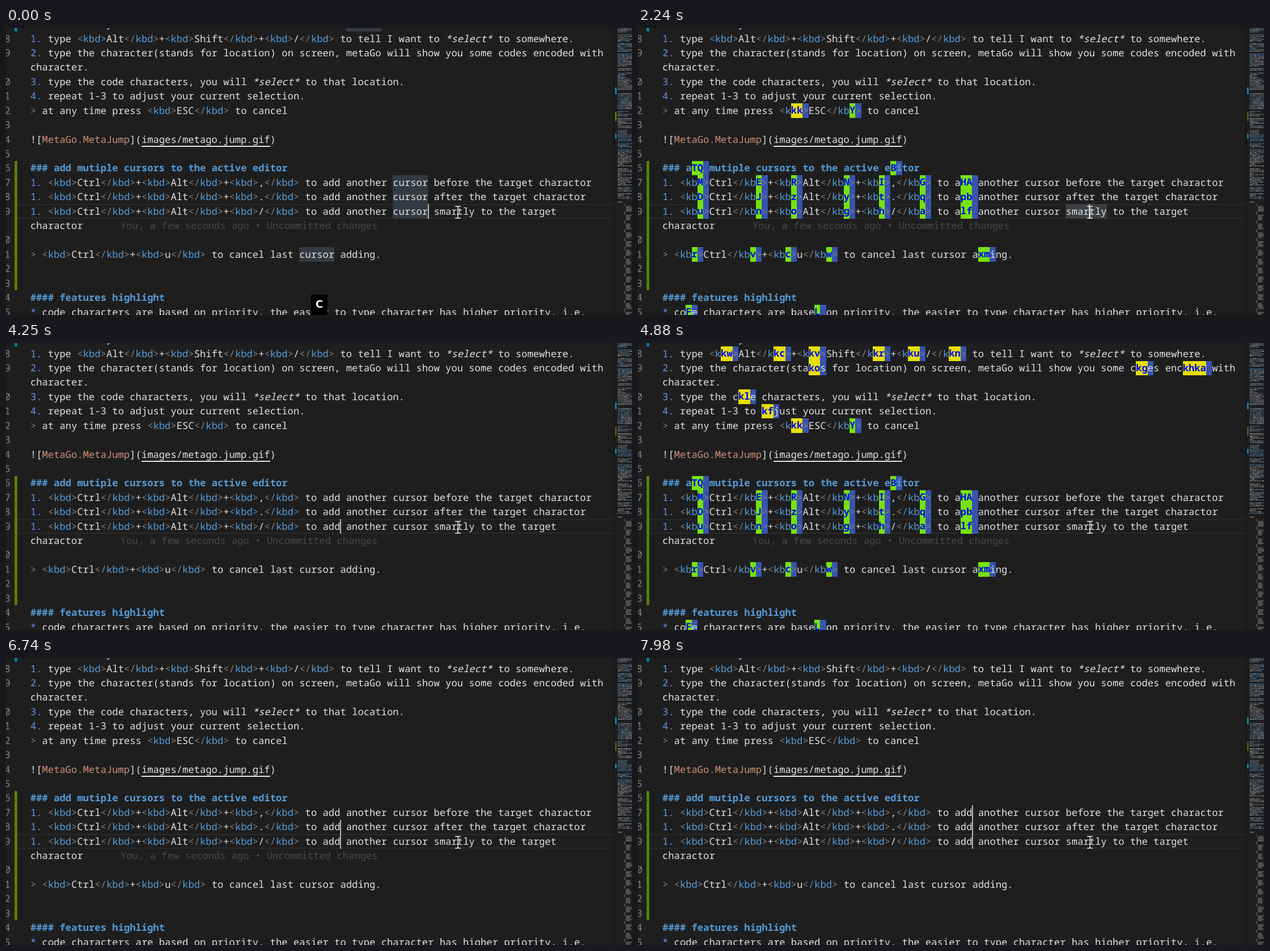
These frames come from a looping animation (1104x507 px, 8000 ms). An HTML page with a canvas:

```html
<!DOCTYPE html>
<html lang="en">
<head>
<meta charset="utf-8">
<title>Multiple cursors</title>
<style>
  html, body { margin: 0; width: 100%; height: 100%; overflow: hidden; background: #1e1e1e; }
  #stage {
    position: relative; width: 1104px; height: 507px; overflow: hidden;
    background: #1e1e1e; color: #e2e2e2;
    font: 500 17.185px/25.42px "Noto Sans Mono", "DejaVu Sans Mono", monospace;
    font-variant-ligatures: none; text-rendering: geometricPrecision;
  }
  #stage > * { position: absolute; white-space: pre; }
  .number { color: #858585; }
  .list { color: #6796e6; }
  .tag { color: #569cd6; }
  .bracket, .quote { color: #808080; }
  .heading { color: #569cd6; font-weight: bold; }
  .link { color: #ce9178; }
  .em { font-style: italic; }
  .note { color: #494949; }
  .green { color: #6a9955; }
  .word { background: #343a41; }
  .picked { background: #3b3e42; }
  .after { background: #3853ad; }
  .code { background: #74e30a; color: #00f; font-weight: bold; }
  .code.pair { background: #e6e000; }
  .caret { background: #b4b5b3; width: 2px; }
  .key {
    left: 538px; top: 471px; width: 29px; height: 36px; background: #000; color: #fff;
    font: bold 18px/36px "DejaVu Sans", sans-serif; text-align: center;
  }
</style>
</head>
<body>
<div id="stage"></div>
<script>
const LOOP = 8000, LEFT = 43, PITCH = 10.311, TOP = 6.1, ROW = 25.42, TEXT_DROP = 0.5;
const stage = document.getElementById('stage');
const timed = [];

const colX = col => LEFT + col * PITCH;
const rowY = row => TOP + row * ROW;

function add(cls, style, text = '') {
  const el = document.createElement('div');
  el.className = cls;
  el.textContent = text;
  for (const key in style) el.style[key] = typeof style[key] === 'number' ? style[key] + 'px' : style[key];
  stage.append(el);
  return el;
}
const box = (left, top, width, height, background) => add('', { left, top, width, height, background });
const cells = (cls, row, col, count) =>
  add(cls, { left: colX(col), top: rowY(row), width: count * PITCH, height: ROW });
const during = (el, ...spans) => (timed.push([el, spans]), el);

// Each word gets its own place on the character grid.
function write(cls, row, col, text) {
  return [...text.matchAll(/\S+/g)].map(m =>
    add(cls, { left: colX(col + m.index), top: rowY(row) + TEXT_DROP }, m[0]));
}

const keys = (...names) => names.map(n => `<kbd>${n}</kbd>`).join('+');
const lines = {
  0: `1. type ${keys('Alt', 'Shift', '/')} to tell I want to *select* to somewhere.`,
  1: '2. type the character(stands for location) on screen, metaGo will show you some codes encoded with',
  2: 'character.',
  3: '3. type the code characters, you will *select* to that location.',
  4: '4. repeat 1-3 to adjust your current selection.',
  5: `> at any time press ${keys('ESC')} to cancel`,
  7: '![MetaGo.MetaJump](images/metago.jump.gif)',
  9: '### add mutiple cursors to the active editor',
  10: `1. ${keys('Ctrl', 'Alt', ',')} to add another cursor before the target charactor`,
  11: `1. ${keys('Ctrl', 'Alt', '.')} to add another cursor after the target charactor`,
  12: `1. ${keys('Ctrl', 'Alt', '/')} to add another cursor smartly to the target`,
  13: 'charactor',
  15: `> ${keys('Ctrl', 'u')} to cancel last cursor adding.`,
  18: '#### features highlight',
  19: '* code characters are based on priority, the easier to type character has higher priority, i.e.'
};

// Jump codes, one for each "d" of a line.
const codes = {
  0: 'kw kc kv kr ku kn', 1: 'ko kg kh ka', 3: 'kl', 4: 'kf', 5: 'kk Y',
  9: 'T Q B', 10: 'M E R N I G H A', 11: 'D J z y t q p b', 12: 'u n o g h a l f',
  15: 'r v c w x m', 19: 'F L'
};
const eachCode = fn => {
  for (const row in codes) {
    const names = codes[row].split(' ');
    [...lines[row].matchAll(/d/g)].forEach((m, i) =>
      fn(+row, m.index, names[i], row < 5 ? [[4880, 5810], [7140, 7980]]
                                          : [[2240, 3100], [4880, 5810], [7140, 7980]]));
  }
};

function drawBackground() {
  for (const y of [311, 335]) box(20, y, 1052, 1.5, '#292929');
  box(15, 0, 5, 6, '#0c7d9d');
  box(15, 235, 5, 228, '#587c0c');
  for (const [row, col] of [[-1, 54], [10, 62], [11, 62], [12, 62], [15, 46]])
    during(cells('word', row, col, 6), [0, 840]);
  during(cells('picked', 12, 69, 7), [1070, 3100]);
  eachCode((row, col, name, spans) => during(cells('after', row, col + 1, 1), ...spans));
}

function drawText() {
  const token = /(^#+ .*)|(^\d\.|^\* )|(^>)|(<\/?)(kbd)(>)|(\*select\*)|(MetaGo\.MetaJump)/g;
  const styles = ['heading', 'list', 'quote', 'bracket', 'tag', 'bracket', 'em', 'link'];
  for (const row in lines) {
    const line = lines[row];
    let end = 0;
    for (const m of line.matchAll(token)) {
      write('', +row, end, line.slice(end, m.index));
      let col = m.index;
      m.slice(1).forEach((part, i) => {
        if (!part) return;
        const parts = write(styles[i], +row, col, part);
        if (styles[i] === 'quote') {
          during(parts[0], [0, 140]);
          during(write('green', +row, col, part)[0], [140, LOOP]);
        }
        col += part.length;
      });
      end = m.index + m[0].length;
    }
    write('', +row, end, line.slice(end));
  }
  write('heading', -1, 13, 'y');
  box(colX(19), 208, 22 * PITCH, 2, '#e2e2e2');

  [...'89 01234567' + '89 012345'].forEach((digit, row) =>
    add('number', { left: -2.5, top: rowY(row) + TEXT_DROP }, digit));

  const noteCol = (202 - LEFT) / PITCH;
  for (const el of write('note', 13, noteCol, 'You, a few seconds ago • Uncommitted changes'))
    during(el, [0, 5810], [6440, 7980]);
}

function drawCarets() {
  const caret = (row, col, ...spans) =>
    during(add('caret', { left: colX(col) - 0.4, top: rowY(row), height: ROW }), ...spans);
  const pair = [[5810, 6280], [6740, 7140], [7750, LOOP]];
  caret(12, 68, [0, 610]);
  caret(12, 73, [1070, 1540], [2090, 2560], [3020, 3100]);
  caret(12, 53, [3100, 3560], [4020, 4560], [5030, 5490], ...pair);
  caret(11, 53, ...pair);
  caret(10, 53, [7980, LOOP]);
}

function drawMinimap() {
  box(1070, 0, 4, 507, 'linear-gradient(90deg, #1e1e1e, #141414)');
  const canvas = document.createElement('canvas');
  canvas.width = 28;
  canvas.height = 507;
  canvas.style.cssText = 'left:1076px;top:0';
  stage.append(canvas);
  const g = canvas.getContext('2d');
  let seed = 7;
  const random = () => (seed = seed * 16807 % 2147483647) / 2147483647;

  for (let y = 1, i = 0; y < 302; y += 2.6, i++) {
    if (i % 13 === 3 || i % 17 === 9) continue;
    const blue = i % 13 === 4 || (y > 118 && y < 130) || (y > 188 && y < 214);
    const end = random() < 0.6 ? 28 : 8 + random() * 18;
    for (let x = 3; x < end;) {
      const w = 1 + random() * 4;
      g.globalAlpha = 0.4 + random() * 0.4;
      g.fillStyle = random() < (blue ? 0.75 : 0.25) ? '#569cd6' : '#c4c4c4';
      g.fillRect(x, y, Math.min(w, end - x), 1.4);
      x += w + 0.8;
    }
  }
  g.globalAlpha = 0.6;
  g.fillStyle = '#c4c4c4';
  g.fillRect(3, 307, 8, 1.3);
  for (let y = 312, i = 0; y < 507; y += 2.6, i++) {
    const edge = i % 6 === 0 || i % 6 === 5;
    g.fillStyle = edge ? '#aaa' : i % 2 ? '#b5a090' : '#a8adb2';
    g.fillRect(edge ? 14 : 17, y, edge ? 2 : 7 + random() * 4, 1.5);
  }
  box(1074, 105, 3, 12, '#1b81a8');
  box(1074, 187, 3, 8, '#1b81a8');
  during(box(1074, 148, 3, 16, '#587c0c'), [0, 140]);
  during(box(1074, 148, 3, 16, '#5c521c'), [140, LOOP]);
}

function drawPointer() {
  const el = add('', { left: 790, top: 312.5 });
  el.innerHTML = `<svg width="14" height="25" style="display:block" fill="none" stroke="#eee" stroke-width="1.5">
    <path d="M2 2H5Q7 2 7 4Q7 2 9 2H12M7 4V21M2 23H5Q7 23 7 21Q7 23 9 23H12M5 16H9"/></svg>`;
}

drawBackground();
drawText();
eachCode((row, col, name, spans) => {
  const cls = name.length > 1 ? 'code pair' : 'code';
  const el = cells(cls, row, col + 1 - name.length, name.length);
  el.textContent = name;
  during(el, ...spans);
});
drawCarets();
drawMinimap();
drawPointer();
during(add('key', {}, 'C'), [0, 140]);

function frame() {
  const t = performance.now() % LOOP;
  for (const [el, spans] of timed)
    el.style.visibility = spans.some(([from, to]) => t >= from && t < to) ? 'visible' : 'hidden';
  requestAnimationFrame(frame);
}
frame();
</script>
</body>
</html>
```
